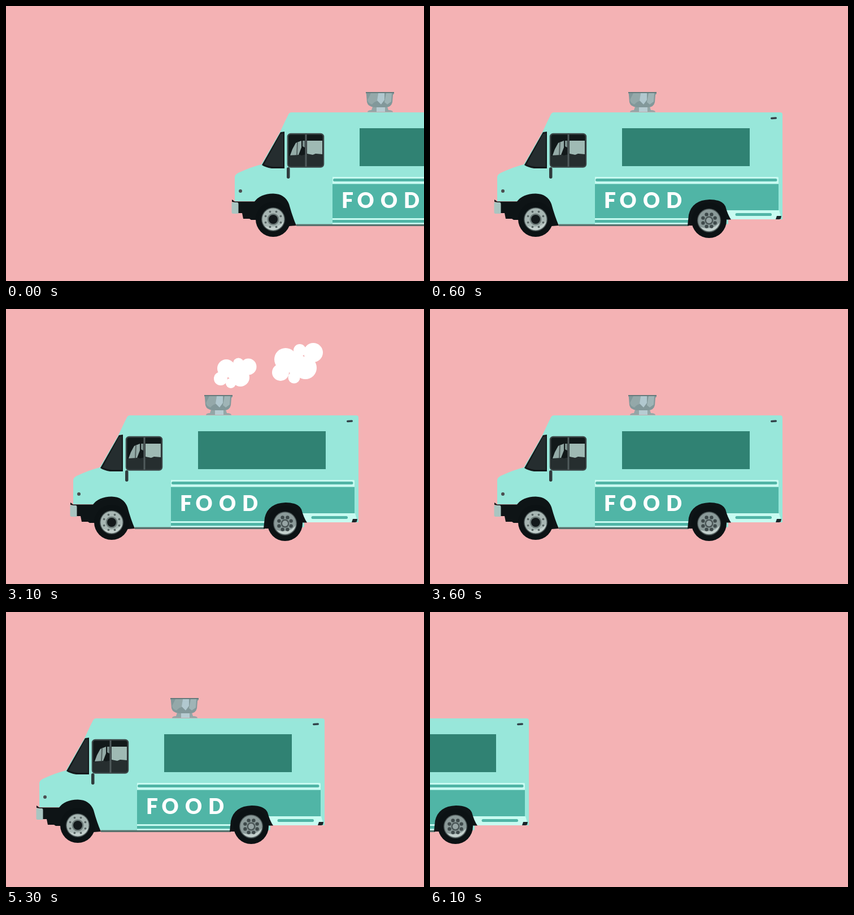
These frames come from a looping animation (740 by 486 pixels, 6.2 s). An HTML page:

```html
<!DOCTYPE html>
<html lang="en">
<head>
<meta charset="utf-8">
<title>Food truck</title>
<style>
  html, body { margin: 0; width: 100%; height: 100%; overflow: hidden; background: #f4b2b4; }
  svg { display: block; width: 740px; height: 486px; }
  text { font: 900 37px Lato, "Open Sans", sans-serif; fill: #fff; }
</style>
</head>
<body>
<svg viewBox="0 0 740 486">
  <g id="truck">
    <!-- roof vent -->
    <path d="M354 187.500 Q354 184 361 184 L363 178 H389 L391 184 Q399 184 399 187.500 Z" fill="#93a6a7"/>
    <path d="M370 179 H385 V187 H370 Z" fill="#b7ccd2"/>
    <path d="M351 152 H401 V155 L399 157 L398 170 Q396 179 386 179 H366 Q355 178 353 170 L352 157 Z" fill="#82989a"/>
    <path d="M351 152 H401 V154 H351 Z" fill="#647a7b"/>
    <path d="M360 154 H373 L371 168 Q366 169 362 174 Q355 172 354 166 Z" fill="#94a8a9"/>
    <path d="M373 154 H384 V166 L378 174 L371 167 Z" fill="#b1c8cf"/>
    <path d="M387 154 H397 L396 169 L389 174 L384 170 Z" fill="#9fb4b6"/>

    <!-- body -->
    <path d="M228 385 H458 V389 H228 Z" fill="#59716d"/>
    <path d="M219 188 H620 Q624 188 624 192 V377 H528 V385.500 H226 L190 345 H119 V303 Q119 298 125 295 Q149 284 166 280 L199 223 Q212 195 215 190 Q217 188 219 188 Z" fill="#98e7da"/>
    <rect x="340" y="216" width="226" height="67" fill="#308273"/>
    <rect x="603" y="196.500" width="11" height="3.500" rx="1.700" fill="#32434a" transform="rotate(-3 608 198)"/>

    <!-- side panel -->
    <path d="M292 302 H615 Q617 302 617 304 V315 H292 Z" fill="#c8fbf1"/>
    <rect x="293" y="305" width="321.500" height="5" rx="2.500" fill="#50b5a6"/>
    <path d="M292 314.500 H617 V361 H530 V375 H292 Z" fill="#50b5a6"/>
    <path d="M292 375 H460 V385.500 H292 Z M525 361 H618 L621 372 L617 377 H525 Z" fill="#c8fbf1"/>
    <rect x="292" y="378" width="168" height="5" fill="#50b5a6"/>
    <rect x="540.500" y="366" width="64.500" height="5" rx="2.500" fill="#50b5a6"/>
    <path d="M614 371 H622 L621 376 L618 377 H612 Z" fill="#1b2428"/>
    <text y="357" x="308 335.500 377 418">FOOD</text>

    <!-- cab windows -->
    <path d="M200 223 L207 222 V287 H184 Q173 285 167 281 Z" fill="#14191b"/>
    <path d="M200 226 L205 225 V284 H187 Q178 283 171 280 Z" fill="#252d2f"/>
    <rect x="213" y="226" width="63" height="58.500" rx="5" fill="#12191a" stroke="#3c4748" stroke-width="2.500"/>
    <path d="M215 265 L228 261 L237 264 L250 261 L274 262 V281 Q274 283 271 283 H215 Z" fill="#262e2f"/>
    <path d="M247 238 H274 V262 L262 261 L257 263 L247 261 Z" fill="#9fbab4"/>
    <path d="M227 242 L237 238 V250 L232 263 L217 264 L221 253 Z" fill="#94aba7"/>
    <path d="M239 238 H243 V250 L239 248 Z" fill="#798e8b"/>
    <path d="M229 241 L231 240 L230 263 H228 Z" fill="#52605f"/>
    <path d="M245 227 V284" stroke="#505b5c" stroke-width="3"/>
    <rect x="211" y="285" width="5.500" height="20" rx="2.700" fill="#303b3d"/>
    <circle cx="129" cy="327" r="3" fill="#4b4e50"/>

    <!-- bumper and arches -->
    <path d="M114 342 L119 345.500 H154 Q164 332 187 331.500 Q208 332 215 350 Q221 372 228 388 L215 389 L162 378 H148 L145 376 H134 L132 366 H125 V348 L114 346 Z" fill="#0e1416"/>
    <path d="M113.500 347 H123 Q125.500 347 125.500 350 V367 H116 Q113.500 367 113.500 364 Z" fill="#a9c5c1"/>
    <path d="M456 388 L458 369 Q464 343 495 342 Q517 342 523 354 Q527 369 533 377.500 H520 L480 388 Z" fill="#0e1416"/>
    <g id="wheels"></g>
  </g>
  <g id="puffs" fill="#fff"></g>
</svg>
<script>
const LOOP = 6200;
const $ = id => document.getElementById(id);

function add(parent, tag, attrs) {
  const node = document.createElementNS("http://www.w3.org/2000/svg", tag);
  for (const key in attrs) node.setAttribute(key, attrs[key]);
  return parent.appendChild(node);
}
const disc = (parent, cx, cy, r, fill) =>
  add(parent, "circle", fill ? { cx, cy, r, fill } : { cx, cy, r });

function wheel(cx, cy, style) {
  const g = add($("wheels"), "g", {});
  disc(g, cx, cy, 31, "#0c1214");
  disc(g, cx, cy, 21, "#4a5555");
  disc(g, cx, cy, 19.5, style.rim);
  add(g, "path", {
    d: `M${cx - 15} ${cy + 12}A19.5 19.5 0 0 0 ${cx + 19} ${cy + 3}Q${cx + 8} ${cy + 18} ${cx - 15} ${cy + 12}Z`,
    fill: "#c3d0cd"
  });
  for (let i = 0; i < 8; i++) {
    const a = (i + 0.5) * Math.PI / 4;
    disc(g, cx + style.ring * Math.cos(a), cy + style.ring * Math.sin(a), style.hole, style.dark);
  }
  disc(g, cx, cy, style.hub + 2.5, style.collar);
  disc(g, cx, cy, style.hub, style.cap);
}
wheel(187, 377, { rim: "#a7b6b3", ring: 14.5, hole: 1.9, dark: "#596665", hub: 8, collar: "#6f7d7b", cap: "#13191b" });
wheel(494, 379, { rim: "#8b9a99", ring: 11.5, hole: 3.2, dark: "#3f4a4b", hub: 5, collar: "#4b5657", cap: "#96a4a4" });

function puff(circles) {
  const g = add($("puffs"), "g", {});
  circles.forEach(c => disc(g, ...c));
  return g;
}
const small = puff([[390, 105, 16], [411.5, 96, 9.5], [429, 102, 14.5], [415, 121, 16],
  [380, 123, 12], [398, 131, 9], [405, 111, 15]]);
const large = puff([[495, 89, 20], [520, 73, 11], [544, 77, 17], [530, 104, 20],
  [486, 112, 15], [510, 121, 10.5], [513, 97, 19]]);

// [start time, horizontal offset]
const drive = [[0, 286], [100, 215], [200, 145], [400, 88], [600, 0], [5300, -60],
  [5500, -135], [5700, -210], [5900, -290], [6000, -370], [6100, -449]];

function draw(t) {
  const [, x] = drive.findLast(([start]) => start <= t);
  $("truck").setAttribute("transform", `translate(${x})`);
  // each puff cycle: small, both, none
  const beat = t >= 1100 && t < 5300 ? Math.floor((t - 1100) / 500) % 3 : 2;
  small.style.display = beat < 2 ? "" : "none";
  large.style.display = beat === 1 ? "" : "none";
}

const begin = performance.now();
function tick(now) {
  draw(Math.max(0, now - begin) % LOOP);
  requestAnimationFrame(tick);
}
draw(0);
requestAnimationFrame(tick);
</script>
</body>
</html>
```
